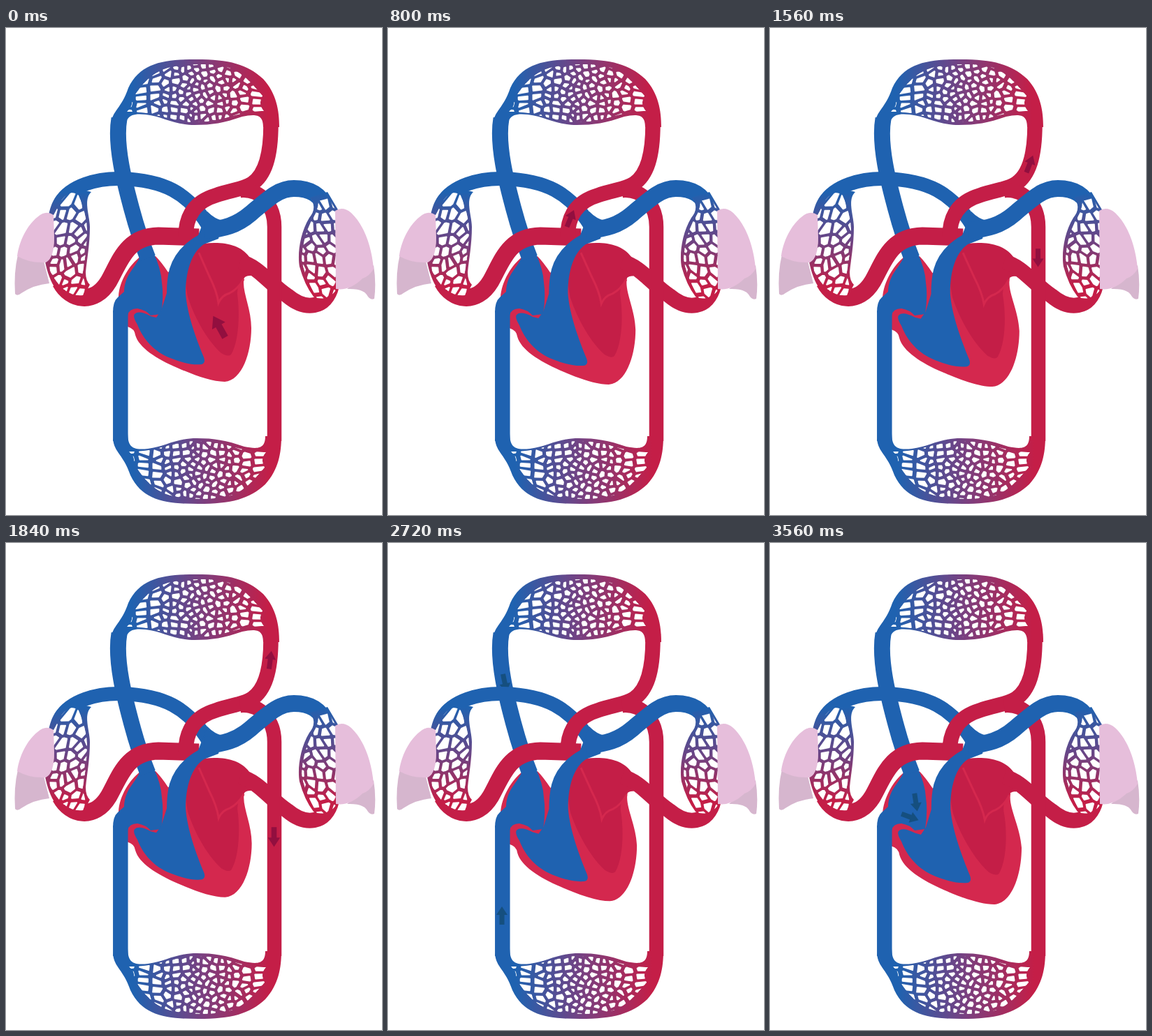
Recreate the animation shown at these times as an HTML page. Size 538 px wide and 698 px high, loop 3600 ms.

```html
<!DOCTYPE html>
<html lang="en">
<head>
<meta charset="utf-8">
<title>Blood circulation</title>
<style>
  html, body { margin: 0; width: 100%; height: 100%; overflow: hidden; background: #fff; }
  svg { display: block; }
  .tube { fill: none; }
  .holes { fill: #fff; stroke: #fff; stroke-width: 2; stroke-linejoin: round; }
</style>
</head>
<body>
<svg width="538" height="698" viewBox="0 0 538 698">
  <defs>
    <linearGradient id="body" gradientUnits="userSpaceOnUse" x1="180" y1="0" x2="375" y2="0">
      <stop stop-color="#1f62b0"/><stop offset=".5" stop-color="#7a4080"/><stop offset="1" stop-color="#c41e47"/>
    </linearGradient>
    <linearGradient id="lung" gradientUnits="userSpaceOnUse" x1="0" y1="235" x2="0" y2="370">
      <stop stop-color="#1f62b0"/><stop offset=".5" stop-color="#6a4585"/><stop offset="1" stop-color="#c41e47"/>
    </linearGradient>
    <clipPath id="bodyClip"><path d="M173,120 Q182,112 180,103 C192,84 204,68 226,59 C250,50 300,50 322,58 C343,67 355,84 367,97 Q360,109 369,119 C335,118 310,135 272,135 C235,135 218,120 173,120Z"/></clipPath>
    <clipPath id="leftClip"><path d="M80,246 Q92,230 104,240 Q116,270 116,290 Q115,325 109,355 Q117,370 110,383 Q82,386 63,348 Q60,320 67,270Z"/></clipPath>
    <clipPath id="rightClip"><path d="M447,248 L462,244 L474,265 V372 Q465,390 445,387 Q426,355 423,330 Q425,300 437,276 Q447,262 447,248Z"/></clipPath>
    <path id="arrow" d="M13,0 L1,-8 V-3.5 H-13 V3.5 H1 V8Z"/>
    <g id="bed">
      <path fill="url(#body)" d="M150,138 C152,118 165,116 175,86 C192,50 225,45 272,45 C320,45 345,52 368,73 C387,94 391,118 391,142 H368 C368,122 355,124 338,127 C312,136 295,139 270,139 C240,139 225,127 200,124 C174,121 172,130 171,146Z"/>
      <g clip-path="url(#bodyClip)"><path id="bodyHoles" class="holes"/></g>
    </g>
  </defs>

  <!-- heart -->
  <path data-beat="1" fill="#d4284e" d="M192,328 C178,338 162,362 161,385 L172,400 L174,428 Q184,431 185,440 C190,458 215,474 245,487 C270,498 295,507 313,507 C338,505 351,465 351,430 C351,400 336,375 341,357 L300,330 L260,330 L232,350 Q222,335 214,327Z"/>
  <path data-beat=".65" fill="#c41e47" d="M283,309 C310,306 335,310 348,328 L362,345 L350,355 Q342,354 338,362 Q330,372 331,382 C335,410 333,450 322,468 Q318,472 308,466 C285,445 268,410 260,385 Q253,350 262,335 Q270,318 283,309Z"/>
  <path data-beat=".65" class="tube" stroke="#d4284e" stroke-width="3" d="M276,322 Q284,340 291,356 Q302,378 304,394 Q309,383 320,380 Q332,374 340,360"/>
  <path fill="#1f62b0" d="M193,325 C185,345 170,352 169,378 L160,386 Q153,392 153,408 L174,412 Q176,402 188,402 Q200,404 207,412 L222,410 Q226,385 223,365 Q222,345 211,322Z"/>

  <!-- body veins -->
  <g class="tube" stroke="#1f62b0">
    <path stroke-width="23" d="M162,130 C155,170 172,230 180,260 C188,290 195,310 203,330"/>
    <path stroke-width="21.5" d="M163.8,405 V592"/>
  </g>
  <use href="#bed"/>
  <use href="#bed" transform="matrix(1 0 0 -1 3 727)"/>
  <g id="blueArrows" fill="#154f7f"/>

  <!-- lung vessels and aorta -->
  <path class="tube" stroke="#1f62b0" stroke-width="20" d="M78,250 C92,226 130,215 165,216 C225,218 260,235 290,284"/>
  <g class="tube" stroke="#c41e47">
    <path stroke-width="25" d="M78,364 C92,390 126,398 147,363 C163,335 172,299 218,298 L276,300"/>
    <path stroke-width="22" d="M335,335 C362,342 378,368 403,384 C428,405 458,403 466,369"/>
    <path stroke-width="21.5" d="M257,300 C257,270 270,249 300,240 C322,232 338,232 352,223 C370,211 379,185 379,138"/>
    <path stroke-width="20.5" d="M335,233 C365,230 384,255 384,285 V592"/>
  </g>
  <g id="redArrows" fill="#920f3f"/>
  <path data-beat=".5" fill="#1f62b0" d="M275,297 Q243,315 234,345 Q230,360 230,380 L222,405 L215,415 L207,413 Q190,404 184,410 Q181,414 188,425 C196,446 212,464 235,473 Q262,484 280,482 Q286,480 283,472 C272,445 259,410 257,380 C257,350 265,322 283,310 L304,302 L310,276 Q299,274 288,263Z"/>
  <path class="tube" stroke="#1f62b0" stroke-width="24" d="M284,290 C312,288 330,283 350,266 C375,245 390,230 412,230 C437,230 450,240 458,258"/>

  <!-- lungs -->
  <path fill="url(#lung)" d="M60,275 C63,250 72,237 88,226 L122,235 C110,246 120,270 120,285 C120,310 116,330 114,350 Q114,362 120,368 L105,396 C75,390 62,365 56,335Z"/>
  <g clip-path="url(#leftClip)"><path id="leftHoles" class="holes"/></g>
  <path fill="url(#lung)" d="M460,235 L435,243 Q446,258 434,272 C420,295 417,325 420,342 Q427,368 440,385 L460,400 L476,370 V262Z"/>
  <g clip-path="url(#rightClip)"><path id="rightHoles" class="holes"/></g>
  <g fill="#d6b6ce">
    <path d="M17,325 Q11,350 13,381 Q16,385 22,380 Q40,368 62,366 L54,334Z"/>
    <path d="M526,340 Q530,365 527,388 Q521,391 516,382 Q509,373 488,374Z"/>
  </g>
  <g fill="#e6bedb">
    <path d="M68,268 Q57,260 45,271 C30,283 19,305 16,327 Q34,337 54,336 L57,336 Q69,330 69,300Z"/>
    <path d="M471,262 Q482,255 494,265 C512,282 523,312 526,345 Q520,356 510,359 Q492,377 472,374Z"/>
  </g>
</svg>

<script>
const LOOP = 3600, STEP = 40, BEAT = 600;
const $ = id => document.getElementById(id);
const svgNode = (tag, name, value) => {
  const node = document.createElementNS('http://www.w3.org/2000/svg', tag);
  node.setAttribute(name, value);
  return node;
};
const clamp = v => Math.max(0, Math.min(1, v));
const mix = (a, b, k) => a + (b - a) * k;

let seed = 29;
const random = () => (seed = seed * 16807 % 2147483647) / 2147483647;

// Voronoi cell around p, kept half a gap away from its neighbours.
function cell(p, seeds, gap) {
  let poly = [[-40, -40], [40, -40], [40, 40], [-40, 40]].map(([u, v]) => [p[0] + u, p[1] + v]);
  for (const q of seeds) {
    const du = q[0] - p[0], dv = q[1] - p[1], len = Math.hypot(du, dv);
    if (!len || len > 80) continue;
    const side = ([u, v]) => ((u - p[0]) * du + (v - p[1]) * dv) / len - (len - gap) / 2;
    const kept = [];
    poly.forEach((a, i) => {
      const b = poly[(i + 1) % poly.length], sa = side(a), sb = side(b);
      if (sa <= 0) kept.push(a);
      if (sa * sb < 0) kept.push(a.map((v, n) => mix(v, b[n], sa / (sa - sb))));
    });
    poly = kept;
  }
  return poly;
}

// Capillary holes: u runs along the bed, v across; cells stretch and fan in towards both ends.
function mesh(id, half, reach, size, place) {
  const end = u => Math.min(1, (u / half) ** 2);
  const seeds = [];
  for (let u = -half, odd = 0; u < half; u += size * (1 + 1.5 * end(u)), odd ^= 1) {
    const across = size * (1 + .7 * end(u));
    for (let v = -reach + odd * across / 2; v < reach; v += across)
      seeds.push([u + (random() - .5) * size, v + (random() - .5) * across * .6]);
  }
  $(id).setAttribute('d', seeds.map(p => {
    const poly = cell(p, seeds, 6.2 + 3 * end(p[0]));
    return poly.length > 2 ? `M${poly.map(([u, v]) => place(u, v * (1 - .45 * end(u)))).join('L')}Z` : '';
  }).join(''));
}
mesh('bodyHoles', 100, 50, 9.8, (u, v) => [273 + u, 95 + 7 * (u / 100) ** 2 + v]);
mesh('leftHoles', 100, 70, 13.5, (u, v) => [92 + v - u / 4, 315 + u]);
mesh('rightHoles', 100, 70, 13.5, (u, v) => [448 + v + u / 4, 315 + u]);

// Each arrow follows the middle of its vessel.
const legs = [
  { color: 'red', d: 'M305,428 C285,392 240,315 261,273', from: 0, to: 800, size: [1.35, 1] },
  { color: 'red', d: 'M261,273 Q270,250 300,241 T345,229', from: 800, to: 1200 },
  { color: 'red', d: 'M345,229 C368,212 380,190 380,134', from: 1200, to: 2400, ease: k => 1 - (1 - k) ** 1.5, fade: 'out' },
  { color: 'red', d: 'M345,229 Q383,240 383.5,285 V605', from: 1200, to: 2400, size: [.9, 1.25], fade: 'out' },
  { color: 'blue', d: 'M160,134 C158,190 184,260 190,290 Q202,325 210,380', from: 2400, to: 3600, fade: 'in' },
  { color: 'blue', d: 'M163,600 V420 Q163,375 208,396', from: 2400, to: 3600, fade: 'in' }
];
for (const leg of legs) {
  leg.track = svgNode('path', 'd', leg.d);
  leg.length = leg.track.getTotalLength();
  leg.node = svgNode('use', 'href', '#arrow');
  $(leg.color + 'Arrows').append(leg.node);
}

function moveArrow({ node, track, length, from, to, fade, size = [1, 1], ease = k => k }, t) {
  const shown = t >= from && t < to;
  node.style.display = shown ? '' : 'none';
  if (!shown) return;
  const k = (t - from) / (to - from), s = ease(k) * length;
  const { x, y } = track.getPointAtLength(s);
  const a = track.getPointAtLength(s - 2), b = track.getPointAtLength(s + 2);
  const angle = Math.atan2(b.y - a.y, b.x - a.x) * 180 / Math.PI;
  node.setAttribute('transform', `translate(${x} ${y}) rotate(${angle}) scale(${mix(...size, k)})`);
  node.setAttribute('opacity', fade ? clamp((fade === 'in' ? t - from : to - t) / 120) : 1);
}

const heart = [...document.querySelectorAll('[data-beat]')].map(node =>
  ({ node, gain: +node.dataset.beat, d: node.getAttribute('d') }));

// The heart swells towards its lower right and snaps back.
function swell({ node, gain, d }, amount) {
  node.setAttribute('d', d.replace(/(\d+),(\d+)/g, (_, x, y) => {
    const down = clamp((y - 320) / 180), right = clamp((x - 180) / 150);
    return `${+x + 9 * gain * amount * right * clamp(down * 1.7)},${+y + 11 * gain * amount * down}`;
  }));
}

function draw() {
  const t = Math.floor(performance.now() % LOOP / STEP) * STEP;
  heart.forEach(part => swell(part, t % BEAT / (BEAT - STEP)));
  legs.forEach(leg => moveArrow(leg, t));
  requestAnimationFrame(draw);
}
draw();
</script>
</body>
</html>
```
